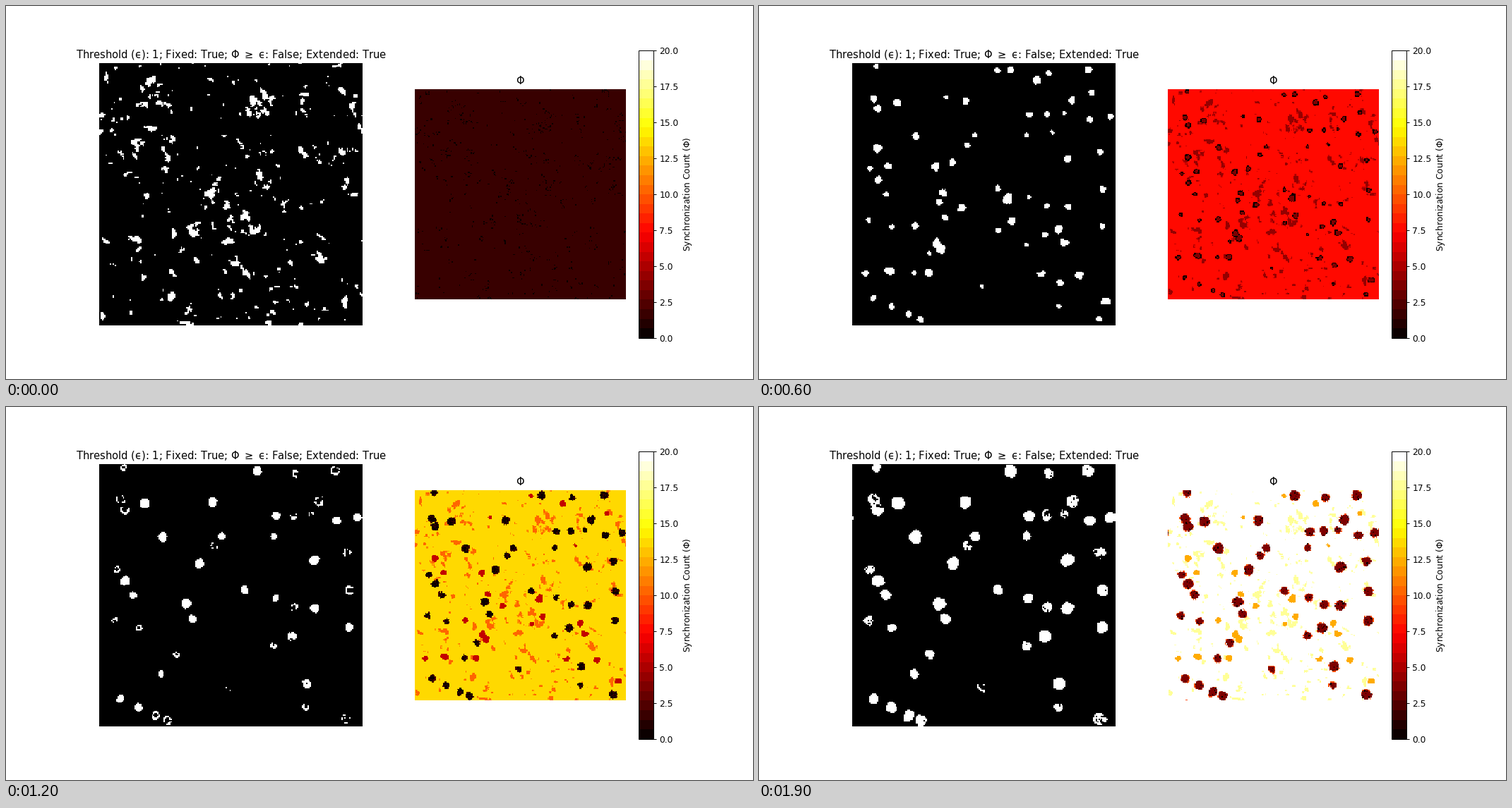
Animation of 1058 by 529 pixels, one loop 2000 ms. Source, as a matplotlib script:

```python
import numpy as np
import matplotlib.pyplot as plt
from matplotlib.animation import FuncAnimation

N = 200            # cells per side
STEPS = 20
LEFT, TOP, CELL = 132.25, 81.0, 1.8635
SPAN = N * CELL

# Largest clusters of each kind in stage pixels; the rest are scattered.
PATCH_KEYS = [(271, 235), (295, 264), (417, 385), (401, 368),
              (184, 328), (254, 342), (232, 413), (208, 104)]
FAST_KEYS = [(222, 185), (256, 280), (405, 326), (437, 218),
             (169, 247), (426, 393), (197, 138), (275, 223)]
SLOW_KEYS = [(163, 133), (168, 146), (443, 134), (486, 261), (212, 439), (483, 444)]
FADING_KEYS = [(252, 337), (259, 345), (186, 377), (454, 383), (352, 275), (261, 266)]

rng = np.random.default_rng(11)
rows, cols = np.mgrid[:N, :N] + 0.5


def smooth_noise(passes, slant=0):
    """Blurred unit noise, stretched along the falling diagonal by slant."""
    a = rng.normal(size=(N, N))
    for _ in range(passes):
        for axis in (0, 1):
            a = a + np.roll(a, 1, axis) + np.roll(a, -1, axis)
    for _ in range(slant):
        a = a + np.roll(a, (1, 1), (0, 1))
    return (a - a.mean()) / a.std()


def distance(x, y):
    """Distance in cells from a stage point, wrapping at the edges."""
    dx = (cols - (x - LEFT) / CELL + N / 2) % N - N / 2
    dy = (rows - (y - TOP) / CELL + N / 2) % N - N / 2
    return np.hypot(dx, dy)


taken = FAST_KEYS + SLOW_KEYS + FADING_KEYS


def scatter(keys, count, r_min, r_max):
    """Discs (distance map, radius): the keys, then random spots kept apart."""
    spots = list(keys)
    while len(spots) < count:
        x, y = rng.uniform(LEFT, LEFT + SPAN), rng.uniform(TOP, TOP + SPAN)
        if all(np.hypot(x - a, y - b) > 17 for a, b in taken):
            spots.append((x, y))
            taken.append((x, y))
    radii = rng.uniform(r_min, r_max, count) / CELL
    radii[:len(keys)] = r_max / CELL
    return [(distance(x, y), r) for (x, y), r in zip(spots, radii)]


def depth(discs, scale):
    """Signed depth in cells inside the union of the scaled discs."""
    return np.max([scale * r - d for d, r in discs], axis=0)


fast = scatter(FAST_KEYS, 24, 6.5, 9)
slow = scatter(SLOW_KEYS, 22, 6, 8.5)
fading = scatter(FADING_KEYS, 24, 3.5, 7)

rough = smooth_noise(2)
holes = smooth_noise(1)
patch = 0.5 * smooth_noise(30) + 0.8 * smooth_noise(3, 2) + 0.5 * smooth_noise(1)
patch -= np.quantile(patch, 0.95)
for x, y in PATCH_KEYS:
    patch += 1.5 * np.exp(-(distance(x, y) / 4) ** 2)


def step(t):
    """White cells and synchronization counts at step t."""
    grain = np.random.default_rng(t).random((N, N))
    white = np.zeros((N, N), bool)
    phi = np.full((N, N), t + 1.0)

    if t < 3:
        white |= patch > 0.4 * t
    if t == 0:
        phi[(np.abs(patch) < 0.2) & (grain < 0.5)] = 0
    else:
        phi[patch > -0.1] = max(t - 1, 0)
        phi[patch > 0.1] = max(t - 2, 0)

    if t >= 2:
        size = np.interp(t, [2, 3, 6], [0.4, 0.45, 0.9])
        d = depth(fading, size) + 0.5 * rough
        inside = d > 0
        if t < 7:
            white |= inside
            phi[inside] = np.where(d < 1, 0, t - 3)[inside].clip(0)
        else:
            if t == 7:
                white |= inside & (d < 1.2) & (holes > 0)
            phi[inside] = t - 7

        size = np.interp(t, [2, 3, 6, 10, 14, 19], [0.2, 0.25, 0.55, 0.62, 0.87, 1])
        groups = (
            (fast, np.interp(t, [10, 14], [1.2, 7]), np.interp(t, [10, 14], [-0.4, -4])),
            (slow, np.interp(t, [10, 14, 17, 19], [1.2, 1.7, 4, 7]),
             np.interp(t, [10, 14, 17, 19], [-0.3, -0.6, -0.2, -1.1])),
        )
        for discs, rim, cut in groups:
            d = depth(discs, size) + 0.35 * rough
            inside = d > 0
            if t < 7:
                white |= inside
                phi[inside] = np.where(d < 1, 0, t - 3)[inside].clip(0)
                continue
            white |= inside & (d < rim) & (holes > cut)
            if t > 11:
                halo = (d > -0.6) & ~inside & (grain < 0.6)
                phi[halo] = np.minimum(phi[halo], t - 10)
            if t < 17:
                phi[inside] = (grain < 0.25)[inside]
            else:
                phi[inside] = np.where(grain < 0.1, 0, t - 16)[inside]
    return white.astype(float), phi


states = [step(t) for t in range(STEPS)]

fig, (ax_state, ax_phi) = plt.subplots(1, 2, figsize=(12, 6), dpi=88.1667)
im_state = ax_state.imshow(states[0][0], cmap="gray", vmin=0, vmax=1,
                           interpolation="nearest")
ax_state.set_title("Threshold (ϵ): 1; Fixed: True; "
                   r"$\Phi$ $\geq$ ϵ: False; Extended: True")
im_phi = ax_phi.imshow(states[0][1], cmap=plt.get_cmap("hot", 30), vmin=0, vmax=20,
                       interpolation="nearest")
ax_phi.set_title(r"$\Phi$")
fig.colorbar(im_phi, ax=ax_phi, label=r"Synchronization Count ($\Phi$)")
for ax in (ax_state, ax_phi):
    ax.axis("off")


def update(t):
    white, phi = states[t]
    im_state.set_data(white)
    im_phi.set_data(phi + 0.4)  # centre counts within the colour bands
    return im_state, im_phi


anim = FuncAnimation(fig, update, frames=STEPS, interval=100, repeat=True,
                     repeat_delay=0)
plt.show()
```
